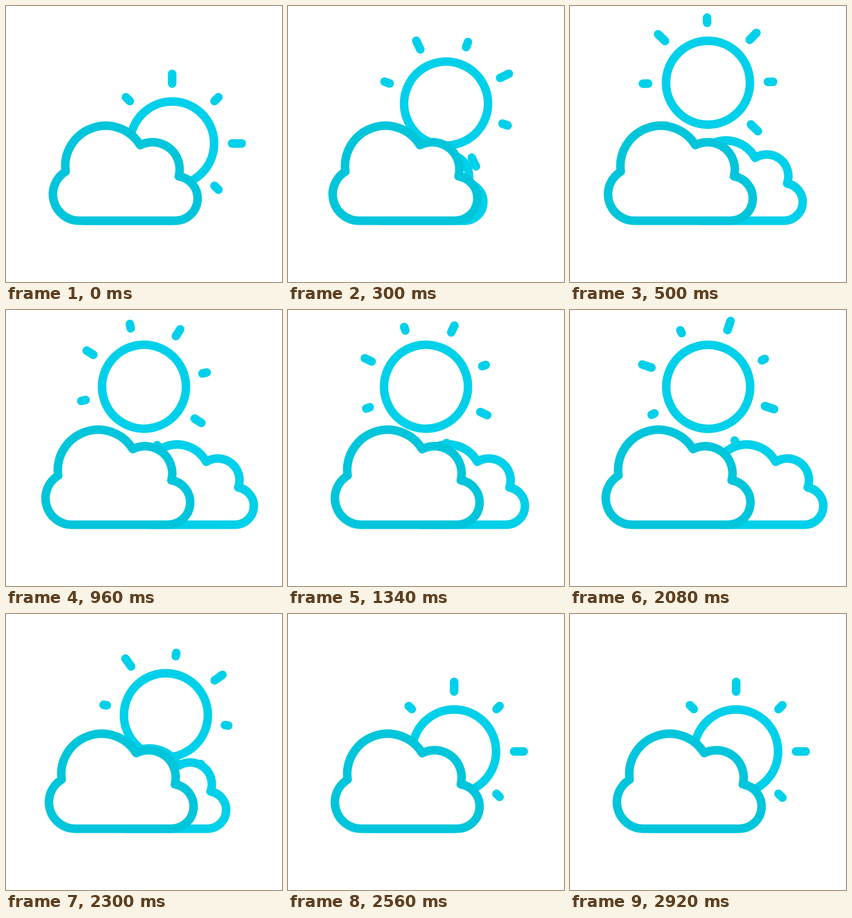
Write an HTML page that moves like this. It is 500 px wide and 500 px high and loops after 3000 ms.

```html
<!DOCTYPE html>
<html lang="en">
<head>
<meta charset="utf-8">
<title>Partly cloudy</title>
<style>
  html, body { margin: 0; width: 100%; height: 100%; overflow: hidden; background: #fff; }
  svg { display: block; width: 100%; height: 100%; }
  .line { stroke: #00d0ea; stroke-width: 15.5; stroke-linecap: round; stroke-linejoin: round; }
  .front { stroke: #00c5db; }
</style>
</head>
<body>
<svg viewBox="0 0 500 500">
  <g id="sun" class="line" fill="none"><circle r="76"/></g>
  <path id="back" class="line" fill="#fff"
    d="M240 389A40 40 0 0 1 220 313A60 60 0 0 1 332 275A39.3 39.3 0 0 1 390 321.5A34 34 0 0 1 385.5 389Z"/>
  <path id="front" class="line front" fill="#fff"
    d="M132 389A48 48 0 0 1 108 300A73.2 73.2 0 0 1 243 252A49.3 49.3 0 0 1 313 308.5A40.5 40.5 0 0 1 306.5 389Z"/>
</svg>
<script>
const LOOP = 3000;
const RAY_INNER = 108.5;
const $ = id => document.getElementById(id);
const sun = $('sun'), back = $('back'), front = $('front');

const progress = (t, from, to) => Math.min(1, Math.max(0, (t - from) / (to - from)));
const smooth = u => u * u * (3 - 2 * u);
const ease = (t, from, to) => smooth(progress(t, from, to));

// Eases from 0 to 1, holds, then eases back to 0.
const visit = (t, inStart, inEnd, outStart, outEnd) =>
  ease(t, inStart, inEnd) - ease(t, outStart, outEnd);

// Eases from 0 to 1 and straight back.
const swing = (t, from, duration) =>
  visit(t, from, from + duration / 2, from + duration / 2, from + duration);

const arc = (a, b, c, u) => a * (1 - u) ** 2 + 2 * b * u * (1 - u) + c * u * u;

const move = (el, x, y = 0, angle = 0) =>
  el.setAttribute('transform', `translate(${x} ${y}) rotate(${angle})`);

const rays = Array.from({ length: 8 }, (_, i) => {
  const ray = document.createElementNS('http://www.w3.org/2000/svg', 'line');
  ray.setAttribute('transform', `rotate(${i * 45})`);
  ray.setAttribute('y1', -RAY_INNER);
  return sun.appendChild(ray);
});

function drawSun(t) {
  const rise = visit(t, 80, 490, 2065, 2535);
  const drift = 1 - (1 - progress(t, 490, 2065)) ** 1.8;
  move(sun, arc(301, 303.5, 250, rise), arc(249, 172, 139, rise), -rise * (45.5 + 26 * drift));

  const longRay = 126 - 4.5 * swing(t, 560, 1250);
  const shortRay = 118.5 - 4.2 * visit(t, 80, 1900, 2200, 2920);
  rays.forEach((ray, i) => ray.setAttribute('y2', -(i % 2 ? shortRay : longRay)));
}

function drawClouds(t) {
  const sway = swing(t, 155, 1110) + swing(t, 1395, 1110);
  const shown = visit(t, 155, 710, 2085, 2570);
  move(back, -87 + 98 * shown + 34.5 * sway);
  move(front, -23.5 * sway);
}

const start = performance.now();
function tick() {
  const t = (performance.now() - start) % LOOP;
  drawSun(t);
  drawClouds(t);
  requestAnimationFrame(tick);
}
tick();
</script>
</body>
</html>
```
